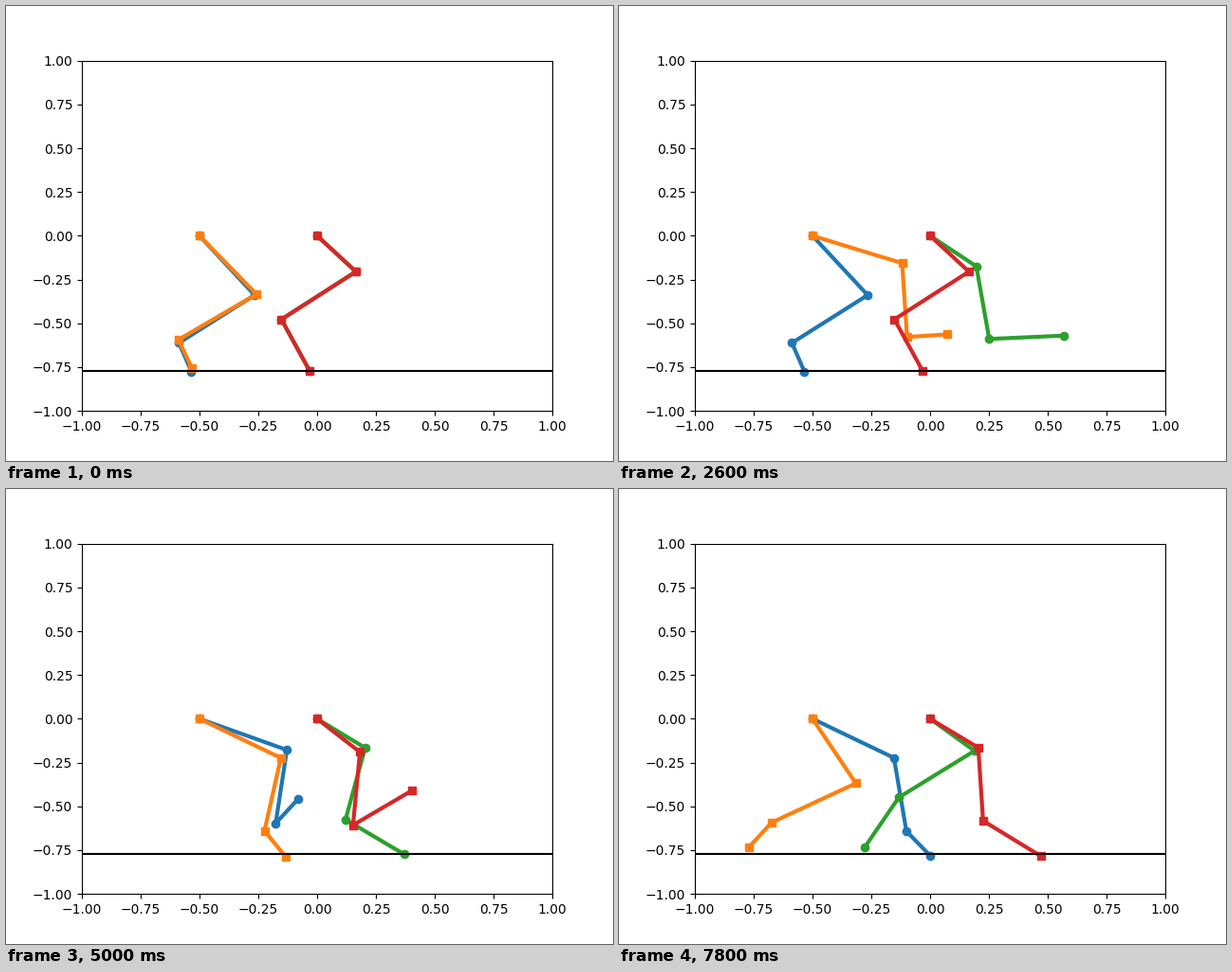
A matplotlib script that plays this animation: 640 px wide and 480 px high, repeating every 8000 ms.

```python
import numpy as np
import matplotlib.pyplot as plt
from matplotlib.animation import FuncAnimation

FRAMES, INTERVAL = 40, 200
START = 1                # a leg rests until this time of its stride
HALF_CYCLE = 16          # frames between a leg and its partner
SWING = 14               # end of the forward swing
GROUND = -0.77


def curve(*keys):
    """Smooth function through (time, value) keys, flat at turning points."""
    t, v = np.array(keys, float).T
    d = np.diff(v) / np.diff(t)
    m = np.r_[d[0], np.zeros(len(d) - 1), d[-1]]
    for i in range(1, len(d)):
        if d[i - 1] * d[i] > 0:
            m[i] = 2 * d[i - 1] * d[i] / (d[i - 1] + d[i])

    def at(time):
        i = np.clip(np.searchsorted(t, time, side="right") - 1, 0, len(d) - 1)
        h = t[i + 1] - t[i]
        s = (time - t[i]) / h
        blend = s * s * (3 - 2 * s)
        return (v[i] + blend * (v[i + 1] - v[i])
                + h * s * (1 - s) * ((1 - s) * m[i] - s * m[i + 1]))

    return at


class Limb:
    """Three bones whose angles, in degrees below horizontal, follow curves."""

    def __init__(self, hip, bones, *angles):
        self.hip, self.bones, self.angles = hip, np.array(bones), angles

    def joints(self, frame, sway):
        t = max(frame, START)
        lean = np.sin(np.pi * min(t, SWING) / SWING) * np.array(sway)
        a = np.radians([f(t) for f in self.angles] + lean)
        x = self.hip + np.cumsum(np.r_[0, self.bones * np.cos(a)])
        y = -np.cumsum(np.r_[0, self.bones * np.sin(a)])
        return x, y


hind = Limb(
    -0.5, (0.412, 0.422, 0.171),
    curve((1, 55.3), (9, 25.6), (17, 22.9), (21, 32.6), (30, 33.2), (39, 63.4)),
    curve((1, 139.7), (9, 96.5), (14, 81.6), (17.5, 63.5), (23, 82.8),
          (25, 99.5), (39, 148)),
    curve((1, 72.1), (7, -66), (14, 9.1), (17, 43.2), (25, 58.7), (30, 94),
          (39, 124.5)))
front = Limb(
    0, (0.263, 0.418, 0.319),
    curve((1, 51.1), (9, 46.2), (17, 38.5), (35, 41), (39, 44.1)),
    curve((1, 139.3), (9, 94), (14, 79.4), (18.5, 61), (25, 101.5),
          (30, 125.2), (39, 140.4)),
    curve((1, 67.8), (6, -51), (14, 3.9), (20, 41), (25, 38.5), (39, 117)))

# limb, delay, sway of each bone during the swing, marker
STILL = (0, 0, 0)
LEGS = [
    (hind, HALF_CYCLE, STILL, "o"),
    (hind, 0, (-6, 10, -8), "s"),
    (front, 0, STILL, "o"),
    (front, HALF_CYCLE, STILL, "s"),
]

fig, ax = plt.subplots(figsize=(6.4, 4.8), dpi=100)
ax.set_xlim(-1, 1)
ax.set_ylim(-1, 1)
lines = [ax.plot([], [], marker=marker, lw=3)[0] for *_, marker in LEGS]
ax.plot([-1, 1], [GROUND, GROUND], color="black", lw=1.5)


def draw(frame):
    for line, (limb, delay, sway, _) in zip(lines, LEGS):
        line.set_data(*limb.joints(frame - delay, sway))
    return lines


anim = FuncAnimation(fig, draw, frames=FRAMES, interval=INTERVAL,
                     repeat=True, repeat_delay=0)
plt.show()
```
